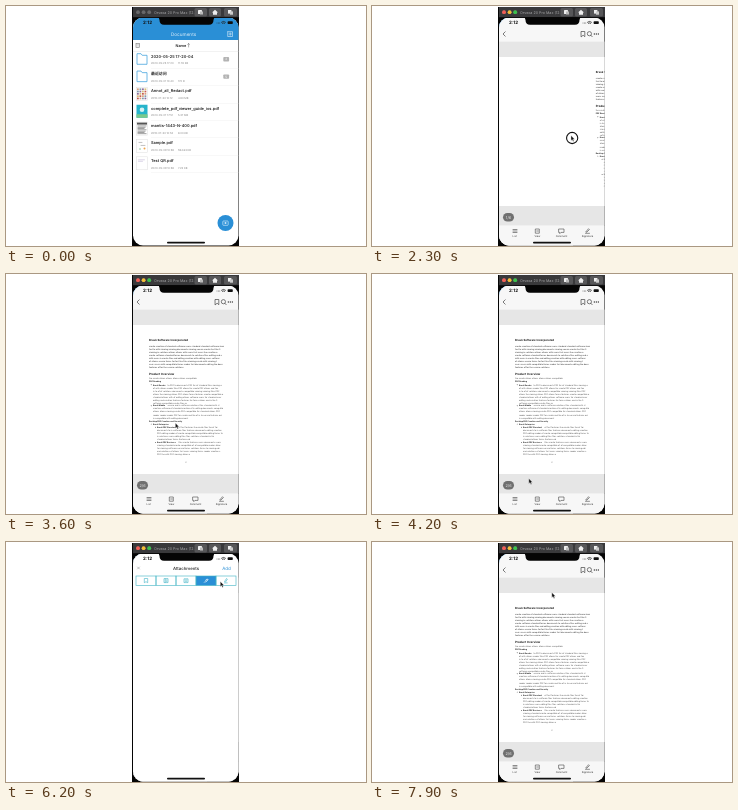
Write an HTML page that moves like this. It is 360 by 240 pixels and loops after 8 s.

```html
<!DOCTYPE html>
<html lang="en">
<head>
<meta charset="utf-8">
<style>
html, body { margin: 0; width: 100%; height: 100%; overflow: hidden; background: #fff; }
svg { display: block; width: 100vw; height: 100vh; }
text { font-family: Inter, "Noto Sans CJK SC", sans-serif; text-rendering: geometricPrecision; white-space: pre; }
</style>
</head>
<body>
<svg id="stage" viewBox="0 0 360 240"></svg>
<script>
const LOOP = 8000;
const BLUE = '#2a8fd6', CYAN = '#3fb2c4', INK = '#222';
const stage = document.getElementById('stage');

const rect = (x, y, w, h, fill, extra = '') =>
  `<rect x="${x}" y="${y}" width="${w}" height="${h}" fill="${fill}" ${extra}/>`;
const circle = (x, y, r, fill, extra = '') =>
  `<circle cx="${x}" cy="${y}" r="${r}" fill="${fill}" ${extra}/>`;
const line = (d, color = INK, width = .6) =>
  `<path d="${d}" fill="none" stroke="${color}" stroke-width="${width}" stroke-linecap="round" stroke-linejoin="round"/>`;
const text = (x, y, size, content, fill = INK, extra = '') =>
  `<text x="${x}" y="${y}" font-size="${size}" fill="${fill}" ${extra}>${content}</text>`;
const MID = 'text-anchor="middle"', BOLD = 'font-weight="600"';
const group = (id, content) => `<g id="${id}">${content}</g>`;

// Small seeded generator for the fine print
let seed = 7;
const random = () => (seed = (seed * 16807) % 2147483647) / 2147483647;
const WORDS = ('PDF documents reader the and of to creation users with editing secure files ' +
  'software solutions for in viewing standard compatible fast forms allows create features').split(' ');
function prose(length) {
  let out = '';
  while (out.length < length) out += WORDS[Math.floor(random() * WORDS.length)] + ' ';
  return out.slice(0, length).trim();
}

function titleBar() {
  const buttons = [[188.5, 12.5], [203, 12], [218, 13]];
  const plain = buttons.map(([x, w]) => rect(x, 2, w, 8.6, '#575759', 'rx="1.5"')).join('');
  const icons = rect(192, 4, 4, 4, '#eee', 'rx=".6"') + rect(194, 5.5, 3, 3, '#bbb') +
    '<path d="M206 6.5L209 3.8L212 6.5H211V8.8H207V6.5Z" fill="#eee"/>' +
    rect(222, 4, 3.4, 3.6, '#eee') + rect(224, 5.4, 3, 3.3, '#ccc');
  const lights = ['#f45c55', '#f5bd35', '#39c24b']
    .map((c, i) => circle(132 + i * 5.6, 6.2, 1.9, c)).join('');
  const idle = [0, 1, 2].map(i => circle(132 + i * 5.6, 6.2, 1.9, '#68686a')).join('');
  return rect(127, 1, 106, 11, '#39393b') + idle + group('lights', lights) +
    text(148, 7.7, 3.7, 'Orvexa 20 Pro Max (12...', '#a5a5a7') + plain + icons;
}

function thumbnail(kind, y) {
  const frame = rect(130.5, y, 11, 13, '#fff', 'stroke="#ddd" stroke-width=".5"');
  if (kind === 0) {
    const tones = ['#d8a17e', '#8f6d9b', '#c55b50', '#7f9cae', '#d8bd78'];
    let tiles = '';
    for (let i = 0; i < 20; i++)
      tiles += rect(131 + i % 4 * 2.5, y + 1 + Math.floor(i / 4) * 2.3, 1.8, 1.7, tones[(i * 3 + (i >> 2)) % 5]);
    return frame + tiles;
  }
  if (kind === 1)
    return rect(130.5, y, 11, 13, '#26b4cb') + rect(130.5, y + 9.5, 11, 3.5, '#7ac98c') +
      circle(136, y + 5, 2.3, '#d5f2f4');
  if (kind === 2) {
    let rows = rect(131, y + .5, 10, 2, '#555');
    for (let i = 0; i < 7; i++) rows += rect(131.5, y + 3.5 + i * 1.3, 9 - i % 3, .7, '#777');
    return frame + rows;
  }
  if (kind === 3)
    return frame + line(`M133 ${y + 3}h3M135 ${y + 6}h4`, '#999', .6) +
      circle(138.5, y + 9, 1, '#f0a54b') + circle(134, y + 9.5, .7, '#70b77e');
  return frame + line(`M132.5 ${y + 3}h6M132.5 ${y + 4.5}h4`, '#b7aace', .5);
}

function fileList() {
  const files = [
    ['2020-05-25 17-20-04', '2020-05-25 17:20', '11.78 KB'],
    ['最近访问', '2020-05-01 10:40', '170 B'],
    ['Annot_all_Redact.pdf', '2019-07-30 10:12', '4.83 MB'],
    ['complete_pdf_viewer_guide_ios.pdf', '2020-05-07 17:51', '5.37 MB'],
    ['mantis-1443-N-400.pdf', '2019-07-30 10:52', '8.00 KB'],
    ['Sample.pdf', '2020-05-09 10:58', '594.63 KB'],
    ['Test QR.pdf', '2020-05-09 10:58', '7.23 KB']
  ];
  let out = rect(127, 12, 106, 228, '#fff') + rect(127, 12, 106, 22, BLUE) +
    text(177.5, 29.5, 4.7, 'Documents', '#e4f2fb', MID) +
    line('M222 25.7h4.5v4.8h-4.8v-4.8M223 28h2.5M224.2 26.8v2.5', '#fff', .5) +
    rect(130, 37.3, 3.3, 4, 'none', 'stroke="#777" stroke-width=".6"') + line('M130.8 38.7h1.8M130.8 40h1.8', '#888', .4) +
    text(169.5, 41, 3.8, 'Name', INK, BOLD) + line('M182.6 41V37.5M181.7 38.5L182.6 37.5L183.5 38.5', '#555', .45) +
    rect(127, 45, 106, .4, '#ddd');
  files.forEach(([name, date, size], i) => {
    const y = 51.7 + i * 17.35;
    out += text(145, y, 3.95, name, INK, BOLD) +
      text(145, y + 6.7, 2.65, date, '#888') + text(172, y + 6.7, 2.65, size, '#888') +
      rect(145, y + 10.6, 88, .3, '#e7e7e7');
    if (i < 2)
      out += line(`M131 ${y + 6.2}v-10.2h4l1.2 1.6h4.8v8.6z`, '#4aa6df', .8) +
        rect(217.3, y - .6, 5.8, 4.4, '#b3b3b3', 'rx=".8"') +
        text(220.2, y + 2.7, 3, i ? 5 : 2, '#fff', MID);
    else out += thumbnail(i - 2, y - 5);
  });
  return out + circle(219.5, 217, 8, BLUE) +
    rect(216.8, 215, 5.4, 4.3, 'none', 'rx=".7" stroke="#c9e7fa" stroke-width=".7"') +
    circle(219.5, 217.1, 1, '#c9e7fa');
}

function pageText() {
  const small = (x, y, length, extra = '') => text(x, y, 2.05, prose(length), '#555', extra);
  const para = (x, y, rows, length, step, extra) => {
    let out = '';
    for (let i = 0; i < rows; i++)
      out += small(x, y + i * step, i === rows - 1 ? length * .5 : length - Math.floor(random() * 4), extra);
    return out;
  };
  const strong = (x, y, s) => text(x, y, 1.95, s, INK, 'font-weight="700"');
  const bullet = (x, y) => circle(x, y - .7, .45, INK);
  return text(143, 67.4, 2.8, 'Brask Software Incorporated', INK, 'font-weight="700"') +
    para(143, 72.7, 8, 74, 3.08, 'font-weight="600"') +
    text(143, 100.6, 2.9, 'Product Overview', INK, 'font-weight="700"') +
    small(143, 104.7, 50) + strong(143, 107.7, 'PDF Reading') +
    bullet(145.2, 111.5) + strong(147, 111.5, 'Brask Reader') + small(161.5, 111.5, 55) + para(147, 114.6, 6, 71, 3.05) +
    bullet(145.2, 132.4) + strong(147, 132.4, 'Brask Mobile') + small(161.5, 132.4, 55) + para(147, 135.4, 4, 71, 3.05) +
    strong(143, 147.5, 'Desktop PDF Creation and Security') +
    bullet(145.2, 150.8) + strong(147, 150.8, 'Brask Enterprise') +
    bullet(149.4, 154) + strong(151, 154, 'Brask PDF Standard') + small(172.5, 154, 44) + para(151, 157, 4, 67, 3.05) +
    bullet(149.4, 169.2) + strong(151, 169.2, 'Brask PDF Business') + small(172.5, 169.2, 44) + para(151, 172.2, 4, 67, 3.05) +
    text(180, 189, 2.2, '2', '#555', MID);
}

function documentView() {
  const tools = [['List', 142.7], ['View', 165.3], ['Comment', 189.5], ['Signature', 215.5]];
  const icons = line('M141 223.5h4M141 225h4M141 226.5h4M163.7 223h3.6v4.2h-3.6zM164.7 225h1.6' +
    'M187 223h5v3.4h-3l-1.2 1.2v-1.2h-.8zM213.5 227.3h4M214 225.7L216.5 222.7L217.4 223.6L215 226z', '#444', .6);
  return rect(127, 12, 106, 228, '#f7f7f7') + rect(127, 35.6, 106, 184, '#e6e6e6') +
    rect(127, 51, 106, 149, '#fff') + group('page', pageText()) +
    line('M133.2 25.8L131 28L133.2 30.2', '#444', .7) +
    line('M209.4 25.5h3.4v5.2l-1.7-1.5l-1.7 1.5zM219 29.4L220.2 30.7', '#444', .7) +
    circle(217.4, 27.7, 2.1, 'none', 'stroke="#444" stroke-width=".7"') +
    [222.4, 224.4, 226.4].map(x => circle(x, 28, .75, '#444')).join('') +
    rect(131, 207, 11, 8.6, '#707070', 'rx="4.3"') +
    `<text id="count" x="136.5" y="212.7" font-size="3.8" fill="#eee" text-anchor="middle"></text>` +
    rect(127, 219.7, 106, 21, '#f7f7f7') + icons +
    tools.map(([s, x]) => text(x, 231.2, 2.5, s, '#333', MID)).join('');
}

const TABS = [
  { title: 'Reading Bookmarks', action: 'Clear' }, { title: 'Outline', action: '' },
  { title: 'Annotations', action: 'Clear' }, { title: 'Attachments', action: 'Add' },
  { title: 'Signatures', action: '' }
];
const TAB_ICONS = [
  'M138.3 36.5h3.4v4.2l-1.7-1l-1.7 1z',
  'M158 36.6h4v4h-4zM159.3 36.6v4M160 38h1.3M160 39.3h1.3',
  'M178 36.8h4v3.8h-4zM178.8 38h2.4M178.8 39.3h2.4',
  'M198 40.7L201.2 37.3Q202.4 36.5 202 38L199.6 40.4M199.3 38.4L201 37',
  'M218 40.9h3.6M218.5 39.6L220.5 36.5L221.4 37.2L219.5 40z'
];
function panel() {
  let out = rect(127, 12, 106, 228, '#fff') + line('M131.5 25L133.5 27M133.5 25L131.5 27', '#888', .5) +
    `<text id="heading" x="180" y="27.7" font-size="4.3" fill="${INK}" text-anchor="middle" font-weight="500"></text>` +
    `<text id="action" x="220.5" y="27.7" font-size="4.5" fill="${BLUE}" text-anchor="middle"></text>` +
    `<rect id="chosen" y="34" width="20" height="9.5" fill="${BLUE}"/>`;
  TAB_ICONS.forEach((d, i) => {
    out += rect(130 + i * 20, 34, 20, 9.5, 'none', `stroke="${CYAN}" stroke-width=".6"`) +
      `<path id="tab${i}" d="${d}" fill="none" stroke-width=".6"/>`;
  });
  return out;
}

const statusBar = text(137, 18.2, 4.5, '2:12', '#111', 'font-weight="700"') +
  [0, 1, 2].map(i => circle(211 + i * 1.4, 17, .45, '#222')).join('') +
  line('M215.5 16.2Q217.5 14.4 219.5 16.2M216.5 17.3Q217.5 16.4 218.5 17.3', '#222', .8) +
  rect(221.6, 15.2, 5.2, 2.9, '#111', 'rx=".8"');

stage.innerHTML = `<clipPath id="screen"><rect x="127" y="11.5" width="105.5" height="228" rx="10"/></clipPath>` +
  rect(0, 0, 360, 240, '#fff') + rect(126, 1, 107, 239, '#050505') + titleBar() +
  rect(126.4, 11.2, 106.6, 20, '#050505') +
  `<g clip-path="url(#screen)">` + group('files', fileList()) + group('document', documentView()) +
  `<rect id="shade" x="127" y="11" width="106" height="229" fill="#000"/>` +
  group('panel', panel()) + statusBar + '</g>' +
  `<path d="M151 11.2Q153.5 11.5 153.5 14Q153.5 18.7 158 18.7H203Q207.5 18.7 207.5 14Q207.5 11.5 210 11.2Z" fill="#050505"/>` +
  rect(161, 235.7, 38, 1.7, '#111', 'rx=".85"') +
  group('cursor', circle(0, 0, 5.6, 'rgba(255,255,255,.25)', 'id="ring" stroke="#111" stroke-width="1.1"') +
    '<path d="M-1.2 -2.6V2.7L0 1.6L.9 3.4L1.8 3L1 1.2H2.5Z" fill="#111" stroke="#fff" stroke-width=".35"/>');

const el = {};
stage.querySelectorAll('[id]').forEach(node => el[node.id] = node);

const clamp = p => Math.max(0, Math.min(1, p));
const easeOut = p => 1 - (1 - clamp(p)) ** 2;
const smooth = p => p * p * (3 - 2 * p);
const slide = (node, x) => node.setAttribute('transform', `translate(${x} 0)`);
const show = (node, on) => node.setAttribute('visibility', on ? 'inherit' : 'hidden');

// [time, x, y]
const PATH = [
  [500, 214, 186], [1200, 196, 143], [1800, 196, 143], [2250, 202, 132], [2600, 170, 132],
  [3100, 175, 132], [3300, 175, 132], [4200, 158, 207], [4450, 144, 226], [4550, 144, 226],
  [4800, 174, 64], [5050, 161, 39], [5250, 161, 39], [5450, 180, 39], [5650, 180, 39],
  [5900, 200, 39], [6000, 200, 39], [6200, 215.5, 42], [6400, 220, 39], [6750, 220, 39],
  [7100, 133, 27], [7300, 133, 27], [7900, 181, 53]
];
const PRESSES = [[1400, 1550], [2250, 2600], [3000, 3250], [4450, 4560], [5100, 5200],
  [5500, 5600], [5900, 5980], [6450, 6550], [7150, 7250]];
const TAB_TIMES = [5150, 5550, 5900, 6500];

function cursorAt(t) {
  const next = PATH.findIndex(k => k[0] > t);
  if (next < 1) return PATH[next < 0 ? PATH.length - 1 : 0].slice(1);
  const [t0, x0, y0] = PATH[next - 1], [t1, x1, y1] = PATH[next];
  const p = smooth((t - t0) / (t1 - t0));
  return [x0 + (x1 - x0) * p, y0 + (y1 - y0) * p];
}

function render(t) {
  show(el.lights, t >= 500);

  const push = easeOut((t - 1566) / 500);
  slide(el.files, -32 * push);
  slide(el.document, 106 * (1 - push));
  show(el.document, push > 0);

  const turn = easeOut((t - 2250) / 400);
  slide(el.page, 106 * (1 - turn));
  show(el.page, turn > 0);
  el.count.textContent = t < 2450 ? '1/6' : '2/6';

  const open = easeOut((t - 4600) / 500) - easeOut((t - 7250) / 400);
  slide(el.panel, -106 * (1 - open));
  show(el.panel, open > 0);
  el.shade.setAttribute('opacity', .58 * open);

  const tab = TAB_TIMES.filter(at => t >= at).length;
  el.heading.textContent = TABS[tab].title;
  el.action.textContent = TABS[tab].action;
  el.chosen.setAttribute('x', 130 + tab * 20);
  TABS.forEach((_, i) => el['tab' + i].setAttribute('stroke', i === tab ? '#fff' : CYAN));

  const [x, y] = cursorAt(t);
  show(el.cursor, t >= 500);
  el.cursor.setAttribute('transform', `translate(${x} ${y})`);
  show(el.ring, t >= 500 && PRESSES.some(([from, to]) => t >= from && t < to));
}

const start = performance.now();
function tick() {
  render((performance.now() - start) % LOOP);
  requestAnimationFrame(tick);
}
tick();
</script>
</body>
</html>
```
